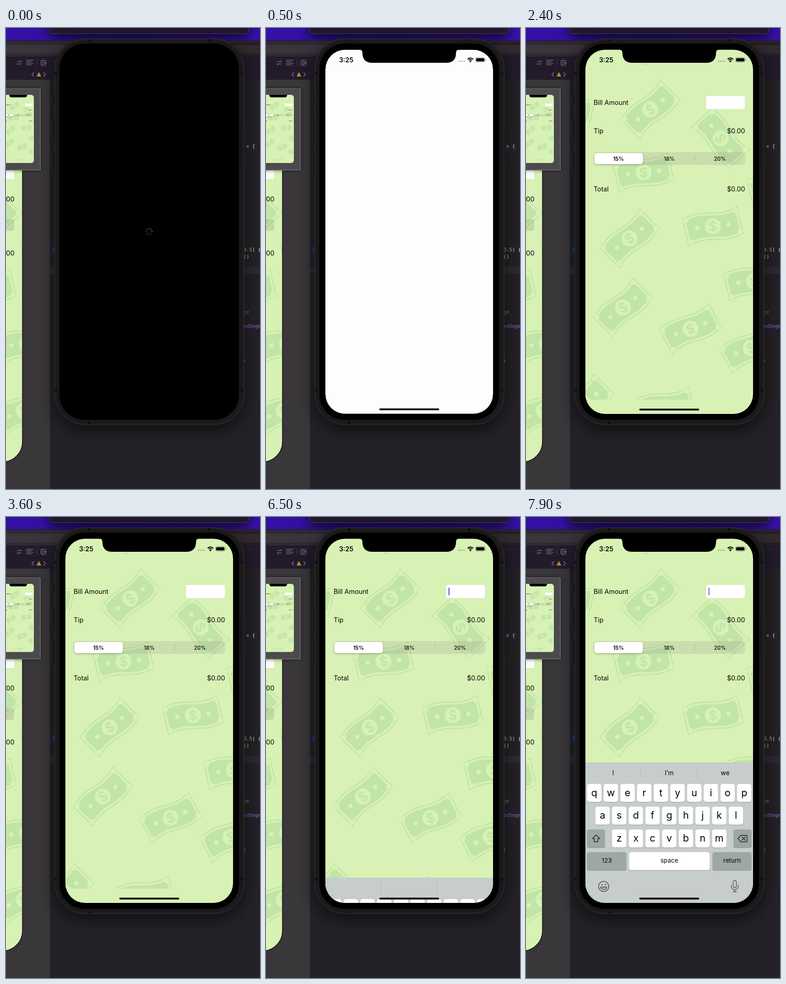
An HTML page with a canvas for the animation above (8000 ms loop, 556x1007 px).

```html
<!DOCTYPE html>
<html lang="en">
<head>
<meta charset="utf-8">
<title>Tip calculator launch</title>
<style>
html, body { margin: 0; width: 100%; height: 100%; overflow: hidden; background: #242228; }
canvas { display: block; }
</style>
</head>
<body>
<canvas id="stage" width="556" height="1007"></canvas>
<script>
const ctx = document.getElementById('stage').getContext('2d');
const LOOP = 8000, STEP = 100;
const LAUNCH = 200, FORM = 2000, TAP = 4400, KEYS = 6400;
const GREEN = '#d8f1b4', NOTE = '#c1e5a6';
const SANS = 'Inter, "Liberation Sans", sans-serif';
const MONO = '"DejaVu Sans Mono", monospace';
const SCREEN = { x: 130, y: 47, w: 367, h: 796, r: 43 };

const clamp = v => Math.max(0, Math.min(1, v));
const smooth = u => u * u * (3 - 2 * u);
const progress = (t, from, span) => clamp((t - from) / span);

function rect(x, y, w, h, fill) {
  ctx.fillStyle = fill;
  ctx.fillRect(x, y, w, h);
}
function roundPath(x, y, w, h, r) {
  ctx.beginPath();
  ctx.roundRect(x, y, w, h, r);
}
function box(x, y, w, h, r, fill) {
  roundPath(x, y, w, h, r);
  ctx.fillStyle = fill;
  ctx.fill();
}
function outline(x, y, w, h, r, color, width = 1) {
  roundPath(x, y, w, h, r);
  ctx.strokeStyle = color;
  ctx.lineWidth = width;
  ctx.stroke();
}
function arc(x, y, r, from, to, color, width) {
  ctx.beginPath();
  ctx.arc(x, y, r, from * Math.PI, to * Math.PI);
  ctx.strokeStyle = color;
  ctx.lineWidth = width;
  ctx.stroke();
}
function disc(x, y, r, fill) {
  ctx.beginPath();
  ctx.arc(x, y, r, 0, Math.PI * 2);
  ctx.fillStyle = fill;
  ctx.fill();
}
function line(color, width, ...pts) {
  ctx.beginPath();
  for (let i = 0; i < pts.length; i += 2) ctx.lineTo(pts[i], pts[i + 1]);
  ctx.strokeStyle = color;
  ctx.lineWidth = width;
  ctx.stroke();
}
function text(str, x, y, size, { color = '#050505', align = 'left', weight = 400, family = SANS } = {}) {
  ctx.font = `${weight} ${size}px ${family}`;
  ctx.textAlign = align;
  ctx.fillStyle = color;
  ctx.fillText(str, x, y);
}
function gradient(x0, y0, x1, y1, ...colors) {
  const g = ctx.createLinearGradient(x0, y0, x1, y1);
  colors.forEach((c, i) => g.addColorStop(i / (colors.length - 1), c));
  return g;
}
function scoped(draw) {
  ctx.save();
  draw();
  ctx.restore();
}
function shadowed(alpha, blur, dy, draw) {
  scoped(() => {
    ctx.shadowColor = `rgba(0,0,0,${alpha})`;
    ctx.shadowBlur = blur;
    ctx.shadowOffsetY = dy;
    draw();
  });
}

// Banknote: a waving rectangle with a coin in the middle
const wave = x => 4.5 * Math.sin(Math.PI * x / 62);
function notePath(w, h) {
  ctx.beginPath();
  for (const side of [-1, 1]) {
    for (let u = -1; u < 1.05; u += 0.1) {
      const x = -side * u * w;
      ctx.lineTo(x, wave(x) + side * h);
    }
  }
  ctx.closePath();
}
function note(x, y, deg) {
  scoped(() => {
    ctx.translate(x, y);
    ctx.rotate(deg * Math.PI / 180);
    notePath(61, 29.5);
    ctx.strokeStyle = NOTE;
    ctx.lineWidth = 2.4;
    ctx.stroke();
    notePath(55.5, 24);
    ctx.fillStyle = NOTE;
    ctx.fill();
    for (const sx of [-1, 1]) {
      for (const sy of [-1, 1]) disc(sx * 55.5, wave(sx * 55.5) + sy * 24, 6, GREEN);
      disc(sx * 34, wave(sx * 34), 5, GREEN);
    }
    disc(0, 0, 17.5, GREEN);
    ctx.rotate(0.2);
    text('$', 0, 10.5, 29, { color: NOTE, align: 'center', weight: 600 });
  });
}

// Three bending columns of notes, plus those cut by the edges
function wallpaper() {
  const STEEP = -45, FLAT = -13, MID = -28;
  const column = (tilts, x, y) => tilts.forEach((tilt, k) => note(x(k), y(k), tilt));
  column([STEEP, FLAT, STEEP, STEEP], k => 272 - 20 * k + 6 * Math.sin(2.1 * k), k => 178 + 134 * k + 3.4 * k * k);
  column([47, FLAT, MID], k => 426 - k - 16 * k * k, k => 241 + 176 * k + 16 * k * k);
  column([FLAT, FLAT, MID], k => 550 - 73 * k + 22 * k * k, k => 347 + 236 * k - 30 * k * k);
  note(302, 26, MID);
  note(85, 171, 14);
  note(127, 821, STEEP);
  note(303, 828, FLAT);
}

function toolbar() {
  const ink = '#8b8590';
  line(ink, 1, 24, 73.5, 34, 73.5, 31, 70.5);
  line(ink, 1, 34, 78.5, 24, 78.5, 27, 81.5);
  for (let i = 0; i < 4; i++) rect(44, 70 + i * 3.3, i % 2 ? 12 : 16, 1, ink);
  rect(68, 70, 1, 12, '#4b4452');
  outline(76.5, 70.5, 11, 11, 2, ink);
  rect(80, 71, 1, 10, ink);
  rect(82, 75.5, 5, 1, ink);
  rect(84, 73.5, 1, 5, ink);
  for (const [x, tip] of [[61, 56.5], [82, 86.5]]) line(ink, 1.2, x, 97, tip, 101.5, x, 106);
  ctx.beginPath();
  ctx.moveTo(72, 96);
  ctx.lineTo(77, 106);
  ctx.lineTo(67, 106);
  ctx.fillStyle = '#b8912a';
  ctx.fill();
}

function editorWindow() {
  rect(0, 0, 556, 1007, '#242228');
  rect(0, 0, 556, 28, gradient(0, 0, 556, 0, '#3510a6', '#2c0f92', '#3810a8'));
  shadowed(0.8, 24, 6, () => box(95.5, -20, 436, 33, 6, '#21182d'));
  outline(95.5, -20, 436, 32.5, 6, '#4c4260');
  rect(0, 27, 556, 3, '#18131d');
  rect(0, 28.5, 556, 1, '#4b454f');
  rect(0, 30, 556, 33, gradient(0, 0, 556, 0, '#302a34', '#251d23'));
  rect(0, 37, 556, 19, 'rgba(255,255,255,.05)');
  rect(0, 63, 556, 50, '#231b2c');
  rect(0, 63, 556, 1, '#151019');
  rect(0, 88, 556, 1, '#18121f');
  rect(0, 113, 96, 894, '#3a373a');
  rect(96, 522, 460, 15, '#2d2b33');
  toolbar();

  const snippet = (str, x, y, color) => text(str, x, y, 10.4, { color, family: MONO });
  snippet('e', 526, 262, '#b49ad8');
  snippet('{', 539, 262, '#e4e2e6');
  snippet('0.5', 520, 488, '#c9bd73');
  snippet(') {', 539, 488, '#e4e2e6');
  snippet('()', 520, 503, '#d0ced3');
  snippet('ge', 520, 624, '#77747c');
  snippet('edSegm', 520, 655, '#9a66d8');
  snippet(')', 519, 730, '#a5a3a8');
  rect(102, 478, 4, 14, '#173a8c');
}

function storyboard() {
  scoped(() => {
    roundPath(-140, 200, 176, 748, 44);
    ctx.fillStyle = GREEN;
    ctx.fill();
    ctx.clip();
    ctx.translate(-453, 137);
    wallpaper();
  });
  outline(-140, 200, 176, 748, 44, '#080808', 1.4);
  box(-20, 300, 38, 30, 4, '#fbfdf8');
  box(-20, 418, 38, 25, 5, 'rgba(118,118,118,.2)');
  for (const y of [379, 497]) text('$0.00', 18.5, y, 14.6, { align: 'right' });
}

// Small copy of the whole form
function minimap() {
  shadowed(0.5, 8, 0, () => rect(-10, 132, 86, 179, '#545355'));
  rect(0, 132, 73, 176, '#4b4a4c');
  line('#737274', 1, 0, 132.5, 75.5, 132.5, 75.5, 310.5, 0, 310.5);
  scoped(() => {
    roundPath(-20, 146, 81, 149, 6);
    ctx.clip();
    ctx.translate(61, 146);
    ctx.scale(0.187, 0.187);
    ctx.translate(-SCREEN.x - SCREEN.w, -SCREEN.y);
    tipForm(0);
    notch();
  });
}

function phoneFrame() {
  const button = (x, y, h) => {
    box(x, y, 5, h, 1.5, '#17161a');
    outline(x, y + 0.5, 5, h, 1.5, '#3d3b41');
  };
  button(102.5, 139, 29);
  button(102.5, 194, 55);
  button(102.5, 266, 55);
  button(519.5, 213, 92);
  shadowed(0.62, 38, 12, () => box(106, 23, 416, 844, 66, '#191919'));
  outline(106.5, 23.5, 415, 843, 65.5, '#343336');
  outline(109, 26, 410, 838, 63, '#202021', 2);
  const seam = (x, y) => rect(x - 2.5, y - 2.5, 5, 5, '#0d0d0d');
  for (const y of [99, 792]) {
    seam(109, y);
    seam(517, y);
  }
  seam(182, 27);
  seam(445, 27);
  seam(182, 863);
  box(117, 34, 393, 822, 55, '#000');
}

function notch() {
  ctx.beginPath();
  ctx.moveTo(203, 40);
  ctx.lineTo(203, 47);
  ctx.quadraticCurveTo(211, 47, 211, 54);
  ctx.quadraticCurveTo(211, 76, 233, 76);
  ctx.lineTo(394, 76);
  ctx.quadraticCurveTo(416, 76, 416, 54);
  ctx.quadraticCurveTo(416, 47, 424, 47);
  ctx.lineTo(424, 40);
  ctx.fillStyle = '#000';
  ctx.fill();
}

function statusBar() {
  const faint = 'rgba(0,0,0,.28)';
  text('3:25', 160, 74.6, 14.2, { weight: 600, color: '#000' });
  for (let i = 0; i < 4; i++) disc(421.5 + i * 4.3, 72.5, 1.5, faint);
  for (const r of [8.6, 5.3]) arc(447.5, 74, r, -0.76, -0.24, '#000', 2);
  disc(447.5, 72.8, 1.9, '#000');
  outline(458.5, 64.5, 21, 10, 3, 'rgba(0,0,0,.42)');
  box(460, 66, 18, 7, 1.8, '#000');
  box(480.8, 67.8, 1.4, 3.6, 0.7, faint);
}
const homeBar = () => box(248, 831, 131, 4, 2, '#000');

function spinner(step) {
  for (let i = 0; i < 8; i++) {
    const a = i * Math.PI / 4, c = Math.cos(a), s = Math.sin(a);
    const v = 78 - ((step + 8 - i) % 8) * 6;
    line(`rgb(${v},${v},${v})`, 1.6, 313 + c * 4, 444.5 + s * 4, 313 + c * 9, 444.5 + s * 9);
  }
}

// White card that grows and brightens until it fills the screen
function launchCard(q) {
  const { x, y, w, h, r } = SCREEN, s = 1 - q;
  rect(x, y, w, h, gradient(0, y, 0, y + h, '#0b0b0b', '#161616', '#252525'));
  rect(x, y, 80, 24, '#35412a');
  scoped(() => {
    ctx.translate(x, 70 + 11.4 * s);
    ctx.scale(1 - 0.031 * s, 1 - 0.0495 * s);
    ctx.translate(-x, -70);
    const v = Math.round(254 * Math.pow(q, 1.1));
    box(x, y + 0.5, w, h - 1, r, `rgb(${v},${Math.max(0, v - 2)},${v})`);
    statusBar();
    homeBar();
  });
}

function tipForm(caret) {
  const { x, y, w, h } = SCREEN, left = 148, right = 479.5;
  rect(x, y, w, h, GREEN);
  scoped(() => {
    ctx.beginPath();
    ctx.rect(x, y, w, 765);
    ctx.clip();
    wallpaper();
  });
  text('Bill Amount', left, 168, 14.3);
  for (const [label, base] of [['Tip', 229.5], ['Total', 356.5]]) {
    text(label, left, base, 14.3);
    text('$0.00', right, base, 14.3, { align: 'right' });
  }

  box(394, 148, 85.5, 29.5, 4, '#fff');
  outline(394, 148, 85.5, 29.5, 4, 'rgba(0,0,0,.08)', 0.8);
  if (caret > 0) rect(399.7, 154.5, 1.8, 16.5, `rgba(60,40,190,${caret})`);

  box(left, 271, right - left, 28, 7, 'rgba(130,118,128,.17)');
  shadowed(0.25, 4, 1.5, () => box(149.5, 273, 106.5, 24.5, 5.5, '#fff'));
  rect(369, 278, 1, 14, 'rgba(70,80,70,.22)');
  ['15%', '18%', '20%'].forEach((s, i) =>
    text(s, 202.5 + i * 111, 289.5, 11.6, { align: 'center', weight: i ? 500 : 600 }));
}

function key(label, x, y, w, size, fill = '#fff') {
  box(x, y + 1, w, 39.5, 5, '#8e9692');
  box(x, y, w, 39.5, 5, fill);
  text(label, x + w / 2, y + 17.5 + size * 0.42, size, { align: 'center' });
}

function keyIcons() {
  const ink = '#1c1c1c', grey = '#4c5250';
  ctx.lineJoin = ctx.lineCap = 'round';
  line(ink, 1.4, 153.5, 694.5, 161.5, 702.5, 157.5, 702.5, 157.5, 709.5, 149.5, 709.5, 149.5, 702.5, 145.5, 702.5, 153.5, 694.5);
  line(ink, 1.4, 464, 702.5, 470, 695.5, 484, 695.5, 484, 709.5, 470, 709.5, 464, 702.5);
  for (const d of [-3.5, 3.5]) line(ink, 1.4, 476.5 - d, 699, 476.5 + d, 706);

  arc(170, 807, 11.2, 0, 2, grey, 1.5);
  for (const d of [-3.7, 3.7]) disc(170 + d, 803, 1.6, grey);
  arc(170, 808, 6.6, 0, 1, grey, 1.5);
  line(grey, 1.5, 163.4, 808, 176.6, 808);
  line(grey, 1, 165, 810.5, 175, 810.5);

  outline(453.5, 794, 7, 16, 3.5, grey, 1.4);
  arc(457, 807, 7.5, 0, 1, grey, 1.4);
  for (const d of [-7.5, 7.5]) line(grey, 1.4, 457 + d, 804, 457 + d, 807);
  line(grey, 1.4, 457, 814.5, 457, 818.5);
  line(grey, 1.4, 453, 818.5, 461, 818.5);
}

function keyboard(shown, hints) {
  const dark = '#9da7a3', pitch = 36.5, cap = 31.5, left = 133.5;
  const top = row => 583 + row * 49.7;
  scoped(() => {
    ctx.translate(0, 307 * (1 - shown));
    rect(SCREEN.x, 536, SCREEN.w, 320, '#c7cdca');
    for (const x of [251, 374]) rect(x, 547, 1, 22, '#b1b8b4');
    if (hints) ['I', 'I’m', 'we'].forEach((s, i) => text(s, 191 + i * 122.5, 563.5, 14, { align: 'center' }));
    ['qwertyuiop', 'asdfghjkl', 'zxcvbnm'].forEach((letters, row) => {
      const x0 = left + (10 - letters.length) * pitch / 2;
      [...letters].forEach((ch, i) => key(ch, x0 + i * pitch, top(row), cap, 21.5));
    });
    key('', left, top(2), 39.5, 0, dark);
    key('', 454, top(2), 40, 0, dark);
    key('123', left, top(3), 86.5, 13.5, dark);
    key('space', 225.5, top(3), 176.5, 13.5);
    key('return', 408, top(3), 86, 13.5, dark);
    keyIcons();
  });
}

function caretAlpha(t) {
  if (t < TAP) return 0;
  return 1 - progress((t - TAP) % 1000, 450, 250);
}

function phoneScreen(t) {
  const launch = progress(t, LAUNCH, 260);
  const form = progress(t, FORM, 300);
  const keys = smooth(progress(t, KEYS, 370));
  if (launch === 0) {
    spinner(t / STEP);
    return;
  }
  scoped(() => {
    roundPath(SCREEN.x, SCREEN.y + 0.5, SCREEN.w, SCREEN.h - 0.5, SCREEN.r);
    ctx.clip();
    if (form < 1) launchCard(launch);
    if (form > 0) {
      ctx.globalAlpha = form;
      tipForm(caretAlpha(t));
      if (keys > 0) keyboard(keys, keys > 0.8);
      statusBar();
      ctx.translate(0, 0.5);
      homeBar();
    }
  });
  notch();
}

function draw(t) {
  editorWindow();
  storyboard();
  minimap();
  phoneFrame();
  phoneScreen(t);
}

const start = performance.now();
let last = -1;
function tick() {
  const t = Math.floor(((performance.now() - start) % LOOP) / STEP) * STEP;
  if (t !== last) draw(last = t);
  requestAnimationFrame(tick);
}
tick();
</script>
</body>
</html>
```
